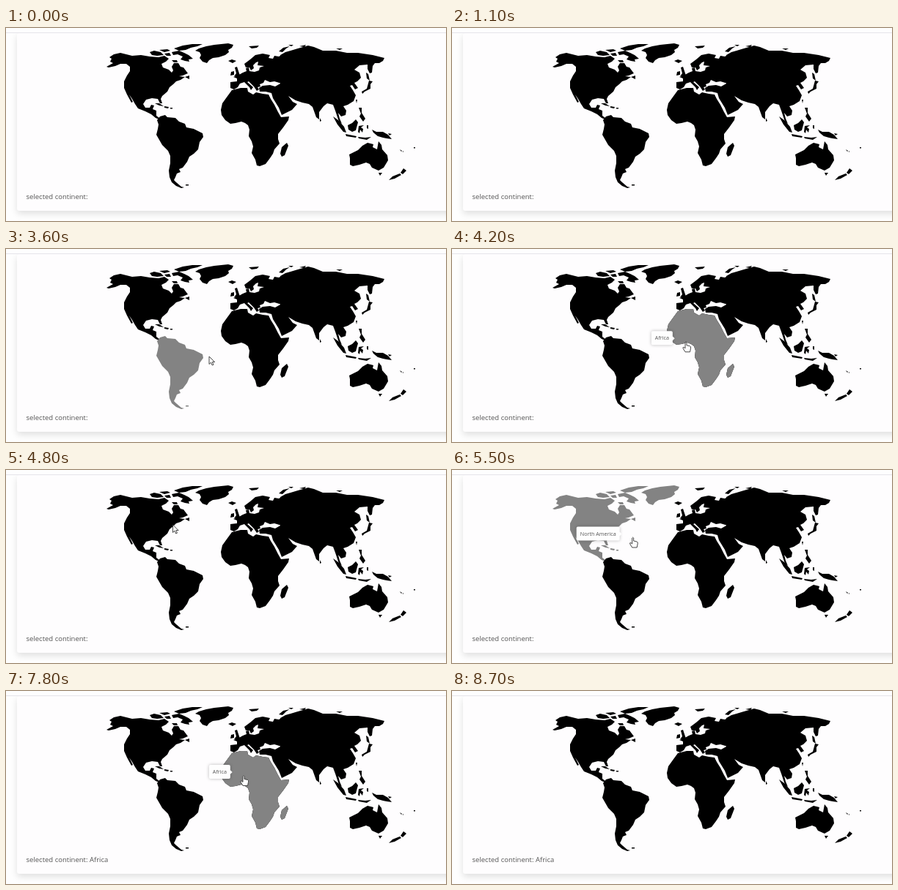
Animation, 600 px wide and 264 px high, one loop 9.9 s. Source, as an HTML page:

```html
<!DOCTYPE html>
<html lang="en">
<head>
<meta charset="utf-8">
<title>Continent picker</title>
<style>
  html, body { margin: 0; width: 100%; height: 100%; overflow: hidden; background: #fefefe; }
  body { position: relative; font-family: "Open Sans", "Noto Sans", sans-serif; color: #555; }
  .bar { position: absolute; top: 6px; left: 0; right: 0; height: 1px; background: #e5e4ea; }
  .card { position: absolute; left: 15px; top: 7px; width: 620px; height: 243px; border-radius: 3px;
    background: #fefdfe; box-shadow: 0 4px 10px rgba(0, 0, 0, .12); clip-path: inset(0 0 -20px -20px); }
  svg { position: absolute; left: 0; top: 0; }
  #label { position: absolute; left: 27.5px; top: 224px; font-size: 9.52px; line-height: 14px; white-space: pre; }
  #tip { position: absolute; left: 0; top: 0; padding: 0 5px; font-size: 7.2px; line-height: 19px; white-space: nowrap;
    background: #fefefe; border-radius: 2px; box-shadow: 0 0 4px rgba(0, 0, 0, .28); }
  #tip::after { content: ""; position: absolute; right: -2px; top: 7.5px; width: 4px; height: 4px;
    background: #fefefe; transform: rotate(45deg); }
</style>
</head>
<body>
<div class="bar"></div>
<div class="card"></div>
<svg width="600" height="264" viewBox="0 0 600 264">
  <g id="north">
    <path d="M137 53L146 48 142 46 144 42 141 40 147 36 156 34 172 38 184 37 196 39 208 40 216 38 222 42 218 46 212 49 214 54 222 57 226 61 228 58 226 53 229 48 235 48 238 53 242 54 248 62 241 65 236 66 244 67 238 71 232 73 228 77 223 81 220 87 213 93 211 97 213 103 210 103 207 97 199 96 191 98 187 104 190 109 196 109 198 105 202 106 200 111 205 113 205 120 209 123 214 124 211 126 204 123 198 118 190 114 180 110 176 104 172 97 168 91 173 101 171 102 165 91 161 82 161 73 165 65 169 59 169 53 164 49 156 49 149 52 140 54Z"/>
    <path d="M263 28L273 25 284 23 303 21 310 23 308 27 303 30 304 33 299 37 290 40 282 41 277 44 274 48 268 46 264 41 266 37 264 33 258 31Z"/>
    <path d="M226 33L236 31 243 34 249 37 255 42 249 43 250 46 244 45 238 43 241 39 234 36 228 37Z"/>
    <path d="M229 28L241 24 254 22 268 22 261 25 252 27 245 30 236 31Z"/>
    <path d="M196 33L202 31 211 33 215 37 206 38 199 37ZM209 30L220 29 224 31 216 33ZM216 35L223 34 225 38 219 38ZM226 44L233 44 234 47 229 47ZM244 67L250 65 250 70ZM203 103L209 103 215 107 209 106ZM216 107L222 108 221 110 216 109ZM224 109h3v1.5h-3z"/>
  </g>
  <path id="south" d="M206 126L210 121 217 119 220 122 231 123 236 128 244 131 246 136 256 138 268 144 269 149 264 156 262 166 256 172 250 176 247 183 241 191 236 193 238 197 233 199 231 204 229 208 232 211 239 217 243 218 239 219 232 216 226 211 223 204 222 195 224 185 224 175 221 168 213 160 205 146 207 138 208 132ZM245 214h4v1.5h-4z"/>
  <path id="europe" d="M306 82L306 74 315 73 315 69 310 67 316 65 323 61 328 59 327 55 331 54 332 59 339 60 345 58 346 54 352 52 343 51 344 46 341 47 337 51 338 55 334 58 332 54 327 54 325 49 333 43 340 37 350 35 360 37 358 41 364 42 366 38 372 39 380 35 384 34 384 62 378 70 376 76 366 73 360 74 353 71 351 75 346 77 347 80 343 81 345 84 342 86 338 80 331 73 329 74 337 81 334 85 332 81 325 74 319 76 316 81 311 84ZM312 54L315 53 318 62 319 65 311 66 314 62ZM307 60L311 59 311 64 306 65ZM303 45L308 43 314 45 309 48ZM331 25L345 24 342 27 335 28Z"/>
  <g id="asia">
    <path d="M374 37L381 33 388 31 398 28 412 24 420 26 432 31 450 31 465 34 480 34 500 37 516 41 514 45 509 48 503 48 500 52 499 61 496 62 493 56 493 50 482 51 475 57 482 61 484 68 479 73 475 75 480 82 476 84 472 78 469 79 473 85 477 92 474 100 466 105 460 107 464 113 463 119 457 121 453 116 455 124 458 131 454 128 449 113 446 105 438 103 433 107 427 115 427 125 423 122 418 108 413 104 404 102 395 99 385 93 391 101 397 104 390 112 376 119 372 109 364 96 362 89 354 87 346 87 345 82 350 79 360 78 367 80 374 76Z"/>
    <path d="M372 32L378 27 387 25 382 28 377 33ZM385 23h7l-3 2zM400 25L409 23 407 26ZM450 28L459 28 455 30ZM491 61L494 63 496 72 492 69ZM495 72L500 73 497 77 497 83 489 87 486 90 485 87 492 83ZM477 98l2 0-1 5zM481 109L485 109 485 116 490 124 487 128 482 121 484 117ZM428 123l2 4-2 1z"/>
    <path d="M446 121L453 126 461 135 464 143 460 142 452 132ZM463 145L478 148 477 150 464 148ZM466 133L472 130 477 125 480 129 477 140 472 142 467 139ZM481 134L488 133 484 136 487 138 486 143 483 139 482 144 480 142ZM480 149L490 150 498 149 492 153 481 151ZM492 133l2 0 0 5-2-1zM499 139L505 142 514 142 521 146 526 152 519 151 514 150 507 148 501 143ZM521 144l5 1-3 2z"/>
  </g>
  <path id="oceania" d="M469 178L468 173 480 167 486 161 493 157 501 159 500 163 506 166 508 155 512 160 513 166 520 174 521 181 515 191 508 195 499 191 496 186 491 184 482 187 473 189 469 187ZM508 198L513 198 510 202ZM542 192L546 195 541 200 538 198ZM537 199L539 201 530 206 522 208 527 203ZM537 166l3 2-1 1zM541 168l1 1-1 1zM556 163h2v1.5h-2z"/>
  <path id="africa" d="M308 85L320 82 329 82 330 87 337 91 341 88 350 90 358 91 361 97 366 105 371 115 375 122 386 121 385 126 378 136 371 145 371 152 373 158 366 166 364 172 360 178 354 186 346 189 342 188 340 180 335 171 337 162 335 155 331 148 332 139 330 133 326 130 321 128 313 130 306 131 299 126 294 119 293 112 295 103 300 96ZM383 157L385 161 380 174 376 176 374 172 376 163Z"/>
</svg>
<div id="label"></div>
<div id="tip"></div>
<svg width="600" height="264" viewBox="0 0 600 264" fill="#fff" stroke="#333" stroke-width=".9" stroke-linejoin="round">
  <path id="arrow" d="M0 0V10.5L2.5 8.2 4.2 12 6 11.2 4.3 7.6H7.6Z"/>
  <path id="hand" d="M-1 1Q0-.8 1 1V5L5.5 6Q7 6.5 6.5 9L5.5 14H-1L-4 9Q-4.5 7-2.5 7.8L-1 9Z"/>
</svg>
<script>
const LOOP = 9900, STEP = 100, FADE = 300, PICKED = 6700;
const NAMES = { north: 'North America', south: 'South America', africa: 'Africa', asia: 'Asia' };

// Hover spans: continent, enter, leave
const HOVERS = [
  ['south', 2850, 3600], ['africa', 3800, 4500], ['north', 4800, 5645],
  ['africa', 5645, 7900], ['asia', 7900, 8000]
];

// Pointer path: time, x, y
const PATH = [
  [2500, 274, 253], [2700, 297, 205], [2900, 262, 162], [3200, 242, 155], [3400, 246, 152],
  [3600, 277, 147], [3900, 316, 131], [4400, 321, 124], [4600, 288, 104], [4800, 227.5, 75],
  [5100, 206, 72], [5400, 217, 78], [5700, 306, 120], [5900, 312, 124], [6500, 324, 115.5],
  [7800, 324, 115.5], [8000, 440, 60], [8100, 520, 24]
];

const $ = id => document.getElementById(id);
const clamp = v => Math.max(0, Math.min(1, v));

function pointerAt(t) {
  const i = PATH.findIndex(p => p[0] > t);
  if (i < 1) return null;
  const [a, b] = [PATH[i - 1], PATH[i]];
  const k = (t - a[0]) / (b[0] - a[0]);
  return [a[1] + (b[1] - a[1]) * k, a[2] + (b[2] - a[2]) * k];
}

function fadeAt(id, t) {
  return HOVERS.filter(h => h[0] === id).reduce(
    (sum, [, enter, leave]) => sum + clamp((t - enter) / FADE) - clamp((t - leave) / FADE), 0);
}

function place(id, shown, pos, suffix = '') {
  $(id).style.display = shown ? '' : 'none';
  if (shown) $(id).style.transform = `translate(${pos[0]}px, ${pos[1]}px) ${suffix}`;
}

function draw(t) {
  for (const id in NAMES) {
    const level = fadeAt(id, t), grey = Math.round(level * 131);
    $(id).style.fill = `rgb(${grey}, ${grey}, ${grey})`;
    if (id === 'africa') $(id).style.filter = level > 0 ? 'drop-shadow(.8px .8px 0 #000)' : '';
  }
  const pos = pointerAt(t);
  const hover = HOVERS.find(h => t > h[1] && t < h[2]);
  place('arrow', pos && !hover, pos);
  place('hand', pos && hover, pos);
  if (hover) $('tip').textContent = NAMES[hover[0]];
  place('tip', pos && hover, pos && [pos[0] - 18, pos[1] - 5], 'translate(-100%, -50%)');
  $('label').textContent = 'selected continent:' + (t >= PICKED ? ' Africa' : '');
}

const start = performance.now();
(function tick() {
  const t = (performance.now() - start) % LOOP;
  draw(Math.floor(t / STEP) * STEP);
  requestAnimationFrame(tick);
})();
</script>
</body>
</html>
```
